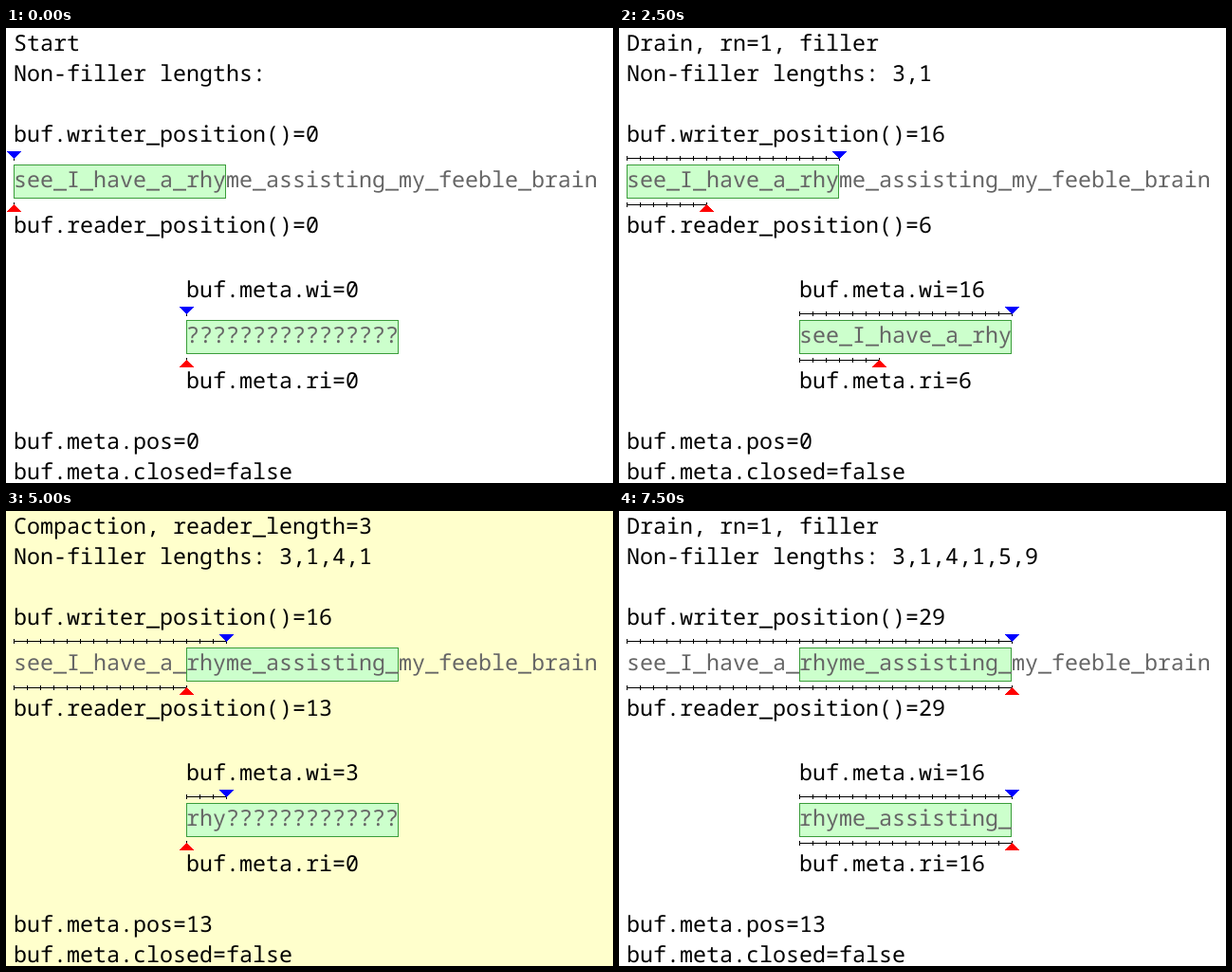
An HTML page for the animation above (8 s loop, 640 by 480 pixels).

```html
<!DOCTYPE html>
<html lang="en">
<head>
<meta charset="utf-8">
<title>Ring buffer walkthrough</title>
<style>
  html, body { margin: 0; width: 100%; height: 100%; overflow: hidden; background: #fff; }
  svg { display: block; width: 640px; height: 480px; }
  text {
    font: 23.333px "Noto Sans Mono", "DejaVu Sans Mono", monospace;
    font-variant-ligatures: none;
    text-rendering: geometricPrecision;
    white-space: pre;
  }
  .data { fill: #666; }
  .window { fill: #cfc; stroke: #3a9d3a; }
  .ruler { stroke: #000; fill: none; shape-rendering: crispEdges; }
  .marker { shape-rendering: crispEdges; }
</style>
</head>
<body>
<svg id="stage" viewBox="0 0 640 480"></svg>
<script>
const STEP = 500, CELL = 14, LEFT = 8, SIZE = 16;
const STREAM = "see_I_have_a_rhyme_assisting_my_feeble_brain";
const stage = document.getElementById("stage");

function add(tag, attrs) {
  const node = document.createElementNS("http://www.w3.org/2000/svg", tag);
  for (const key in attrs) node.setAttribute(key, attrs[key]);
  return stage.appendChild(node);
}

const label = (x, y, cls = "") => add("text", { x, y, class: cls });
const cellX = n => LEFT + n * CELL;
const META_X = cellX(13);

// Run the buffer operations and record the state after each one.
function simulate() {
  const states = [];
  const lengths = [];
  let wi = 0, ri = 0, pos = 0;
  const record = (title, bg = "#fff") =>
    states.push({ title, bg, wi, ri, pos, lengths: lengths.join(",") });
  const fill = () => {
    const n = SIZE - wi;
    wi = SIZE;
    record("Fill, wn=" + n);
  };
  const drain = n => {
    lengths.push(n);
    ri += n;
    record("Drain, rn=" + n);
    ri += 1;
    record("Drain, rn=1, filler");
  };
  const compact = () => {
    pos += ri;
    wi -= ri;
    ri = 0;
    record("Compaction, reader_length=" + wi, "#ffc");
  };
  record("Start");
  fill();
  [3, 1, 4, 1].forEach(drain);
  compact();
  fill();
  [5, 9].forEach(drain);
  return states;
}

// A ruler with one tick per cell and a triangle at its end.
function gauge(x, y, color, dir) {
  const ruler = add("path", { class: "ruler" });
  const base = y + (dir < 0 ? -7 : 8), tip = y + (dir < 0 ? 1 : 0);
  const marker = add("path", {
    class: "marker", fill: color,
    d: `M${x - 7} ${base}H${x + 8}L${x + 0.5} ${tip}Z`
  });
  return n => {
    let d = `M${x} ${y + 0.5}h${n * CELL + 1}`;
    for (let i = 0; i <= n; i++) d += `M${x + i * CELL + 0.5} ${y - 2}v5`;
    ruler.setAttribute("d", d);
    marker.setAttribute("transform", `translate(${n * CELL})`);
  };
}

function buffer(x, y) {
  return add("rect", { class: "window", x: x + 0.5, y: y + 0.5, width: SIZE * CELL - 1, height: 35 });
}

const background = add("rect", { width: 640, height: 480 });
const streamWindow = buffer(LEFT, 144);
buffer(META_X, 308);

const title = label(LEFT, 24);
const lengths = label(LEFT, 56);
const writer = label(LEFT, 120);
const stream = label(LEFT, 168, "data");
const reader = label(LEFT, 216);
const metaWi = label(META_X, 284);
const contents = label(META_X, 332, "data");
const metaRi = label(META_X, 380);
const metaPos = label(LEFT, 444);
const closed = label(LEFT, 476);
stream.textContent = STREAM;
closed.textContent = "buf.meta.closed=false";

const setWriter = gauge(LEFT, 137, "#00f", -1);
const setReader = gauge(LEFT, 186, "#f00", 1);
const setWi = gauge(META_X, 301, "#00f", -1);
const setRi = gauge(META_X, 350, "#f00", 1);

const states = simulate();
let shown = null;

function render(time) {
  const s = states[Math.floor(time / STEP) % states.length];
  if (s !== shown) {
    shown = s;
    const { wi, ri, pos } = s;
    background.setAttribute("fill", s.bg);
    streamWindow.setAttribute("x", cellX(pos) + 0.5);
    title.textContent = s.title;
    lengths.textContent = "Non-filler lengths: " + s.lengths;
    writer.textContent = "buf.writer_position()=" + (pos + wi);
    reader.textContent = "buf.reader_position()=" + (pos + ri);
    metaWi.textContent = "buf.meta.wi=" + wi;
    metaRi.textContent = "buf.meta.ri=" + ri;
    metaPos.textContent = "buf.meta.pos=" + pos;
    contents.textContent = STREAM.slice(pos, pos + wi).padEnd(SIZE, "?");
    setWriter(pos + wi);
    setReader(pos + ri);
    setWi(wi);
    setRi(ri);
  }
}

const start = performance.now();
function tick() {
  render(performance.now() - start);
  requestAnimationFrame(tick);
}
tick();
</script>
</body>
</html>
```
